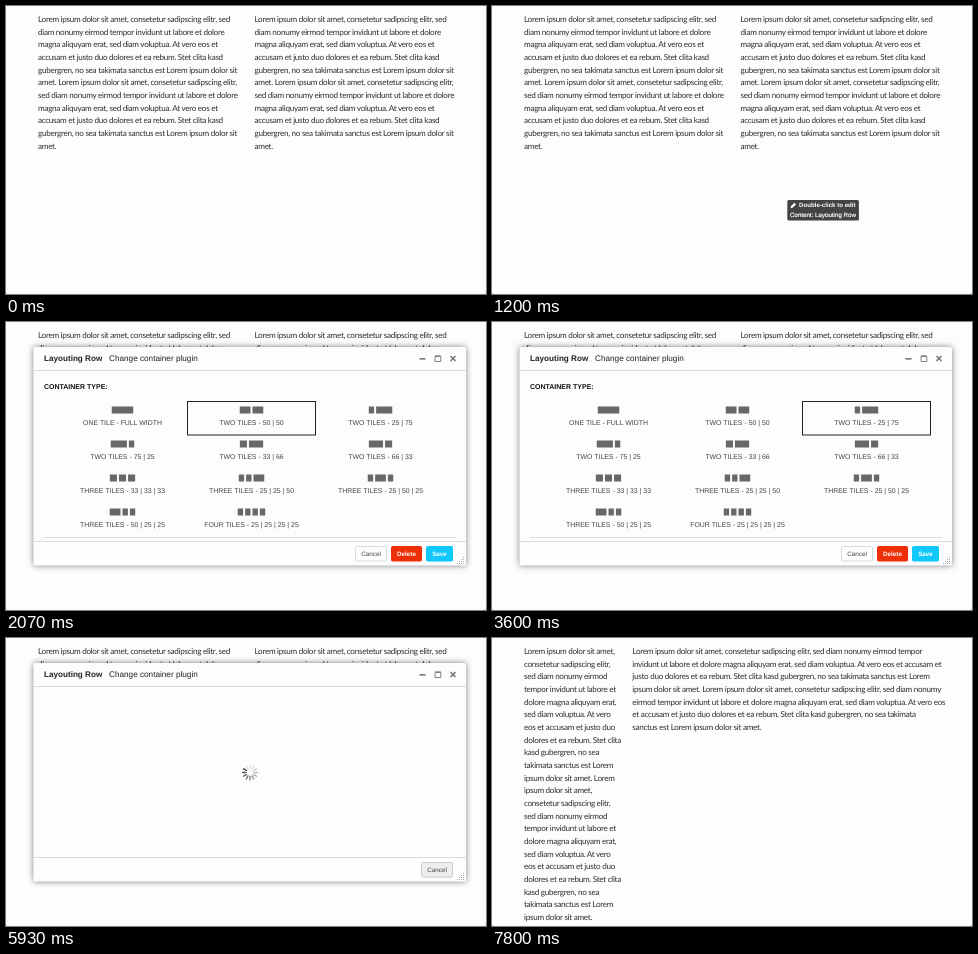
Recreate the animation shown at these times as an HTML page. Size 480 px wide and 288 px high, loop 8990 ms.

```html
<!DOCTYPE html>
<html lang="en">
<head>
<meta charset="utf-8">
<title>Change container plugin</title>
<style>
  html, body { margin: 0; width: 100%; height: 100%; overflow: hidden; background: #d4d3d5; }
  svg { display: block; }
  text { font-family: "Liberation Sans", Arial, sans-serif; text-rendering: geometricPrecision; white-space: pre; }
  .copy text { font: 8.15px Lato, sans-serif; letter-spacing: -0.29px; fill: #2e2e2e; }
  #modal { filter: drop-shadow(0 0 3px rgba(0, 0, 0, .5)); }
</style>
</head>
<body>
<svg id="stage" width="480" height="288" viewBox="0 0 480 288"></svg>
<script>
const LOOP = 8990;
const PAPER = '#fdfcfe';
const NS = 'http://www.w3.org/2000/svg';

// Moments in ms
const HOVER = 800, REST = 1140, OPEN = 1870, PICK = 3270, SAVE = 4270, RELOAD = 6330, READY = 6600;

function add(parent, tag, attrs = {}, content) {
  const el = document.createElementNS(NS, tag);
  for (const key in attrs) el.setAttribute(key, attrs[key]);
  if (content) el.textContent = content;
  parent.appendChild(el);
  return el;
}
const group = (parent, attrs) => add(parent, 'g', attrs);
const rect = (parent, x, y, width, height, fill, more) =>
  add(parent, 'rect', { x, y, width, height, fill, ...more });
const line = (parent, d, stroke, width = 1) =>
  add(parent, 'path', { d, stroke, 'stroke-width': width, fill: 'none' });
const label = (parent, x, y, size, fill, str, more) =>
  add(parent, 'text', { x, y, 'font-size': size, fill, ...more }, str);

const BOLD = { 'font-weight': 700 };
const MID = { 'text-anchor': 'middle' };

// Page copy: the same paragraph, broken into lines by word count
const sentence = 'Lorem ipsum dolor sit amet, consetetur sadipscing elitr, sed diam nonumy eirmod ' +
  'tempor invidunt ut labore et dolore magna aliquyam erat, sed diam voluptua. At vero eos et ' +
  'accusam et justo duo dolores et ea rebum. Stet clita kasd gubergren, no sea takimata sanctus ' +
  'est Lorem ipsum dolor sit amet.';
const words = `${sentence} ${sentence}`.split(' ');

function column(parent, x, counts) {
  let at = 0;
  counts.forEach((n, i) => {
    add(parent, 'text', { x, y: 16.1 + i * 12.66 }, words.slice(at, at + n).join(' '));
    at += n;
  });
}

const stage = document.getElementById('stage');
rect(stage, 0, -6, 480, 294, PAPER, { rx: 3 });

const before = group(stage, { class: 'copy' });
const half = [9, 9, 10, 11, 10, 9, 10, 10, 11, 10, 1];
column(before, 32, half);
column(before, 248.5, half);

const after = group(stage, { class: 'copy' });
column(after, 32, [5, 3, 4, 5, 4, 5, 6, 6, 4, 4, 5, 4, 3, 4, 5, 4, 5, 6, 6, 4, 4, 4]);
column(after, 140.3, [13, 17, 16, 15, 16, 16, 7]);

// Tooltip
const tip = group(stage);
rect(tip, 0, 0, 71.6, 20.5, '#434343', { rx: 1.5 });
add(tip, 'path', { d: 'M3.2 8.2l.6-2.1 3.3-3.3 1.6 1.6-3.3 3.3z', fill: '#fff' });
label(tip, 11.7, 7.4, 6.15, '#fff', 'Double-click to edit', BOLD);
label(tip, 2.6, 16.8, 6.2, '#fff', 'Content: Layouting Row', { stroke: '#fff', 'stroke-width': 0.2 });

// Modal frame
const modal = group(stage, { id: 'modal' });
rect(modal, 27.5, 25, 432.5, 218.5, PAPER, { rx: 1.5 });
line(modal, 'M27.5 48.5H460M27.5 219.5H460', '#dcdcde');
label(modal, 38, 39.2, 8.15, '#222', 'Layouting Row', BOLD);
label(modal, 103, 39.2, 8.2, '#222', 'Change container plugin');
rect(modal, 413.5, 36, 6, 1.6, '#777');
line(modal, 'M429 34.5h5.8v5h-5.8zM429 33.8h5.8', '#777', 0.9);
line(modal, 'M444.5 34l5 5m0-5l-5 5', '#777', 1.6);
for (let r = 0; r < 4; r++)
  for (let c = 0; c <= r; c++)
    rect(modal, 457 - c * 2, 235 + r * 2, 1, 1, '#aaa');

function button(parent, x, width, fill, border, color, str, more) {
  rect(parent, x + 0.5, 224.5, width - 1, 14.5, fill, { stroke: border, rx: 1 });
  label(parent, x + width / 2, 234.3, 6.3, color, str, { ...MID, ...more });
}

// Form: grid of layouts
const form = group(modal);
label(form, 38, 66.6, 7, '#111', 'CONTAINER TYPE:', BOLD);
const layouts = ['ONE TILE - FULL WIDTH', 'TWO TILES - 50 | 50', 'TWO TILES - 25 | 75',
  'TWO TILES - 75 | 25', 'TWO TILES - 33 | 66', 'TWO TILES - 66 | 33',
  'THREE TILES - 33 | 33 | 33', 'THREE TILES - 25 | 25 | 50', 'THREE TILES - 25 | 50 | 25',
  'THREE TILES - 50 | 25 | 25', 'FOUR TILES - 25 | 25 | 25 | 25'];
const centre = col => 116.5 + col * 129;

layouts.forEach((name, i) => {
  const cx = centre(i % 3), y = 84.5 + Math.floor(i / 3) * 34;
  const bars = (name.match(/\d+/g) || [100]).map(p => p * 0.215);
  let x = cx - (bars.reduce((a, b) => a + b) + (bars.length - 1) * 2) / 2;
  for (const w of bars) {
    rect(form, x, y, w, 7, '#686868');
    x += w + 2;
  }
  label(form, cx, y + 18, 6.93, '#444', name, MID);
});
const choice = rect(form, 0, 79.5, 128, 33.5, 'none', { stroke: '#222' });
line(form, 'M38 215.5H450', '#dcdcde');
button(form, 349, 32, PAPER, '#dadada', '#444', 'Cancel');
button(form, 385, 31, '#ef2f07', '#ef2f07', '#fff', 'Delete', BOLD);
button(form, 420, 27, '#10c9fa', '#10c9fa', '#fff', 'Save', BOLD);

// Waiting state
const wait = group(modal);
button(wait, 415, 32, '#eeedef', '#cbcbcb', '#444', 'Cancel');
const spokes = Array.from({ length: 12 }, (_, i) => add(wait, 'path', {
  d: 'M0-4V-7.4', stroke: '#333', 'stroke-width': 1.4, 'stroke-linecap': 'round',
  transform: `translate(244 134.5) rotate(${i * 30})`
}));

const show = (el, on) => { el.style.display = on ? '' : 'none'; };
const clamp = v => Math.min(1, Math.max(0, v));

function draw(t) {
  show(before, t < RELOAD);
  show(after, t >= READY);

  show(tip, t >= HOVER && t < OPEN);
  const left = (1 - clamp((t - HOVER) / (REST - HOVER))) ** 2;
  tip.setAttribute('transform', `translate(${295.3 + 10 * left} ${194 + 68 * left})`);

  show(modal, t >= OPEN && t < RELOAD);
  modal.style.opacity = clamp((t - OPEN + 60) / 160);
  show(form, t < SAVE);
  show(wait, t >= SAVE);
  choice.setAttribute('x', centre(t < PICK ? 1 : 2) - 64);

  const head = Math.floor((t - SAVE + 70) / 90) + 3;
  spokes.forEach((s, i) => {
    const age = (((head - i) % 12) + 12) % 12;
    s.setAttribute('opacity', Math.max(0.12, 0.95 - age * 0.09));
  });
}

const start = performance.now();
function tick() {
  draw((performance.now() - start) % LOOP);
  requestAnimationFrame(tick);
}
tick();
</script>
</body>
</html>
```
